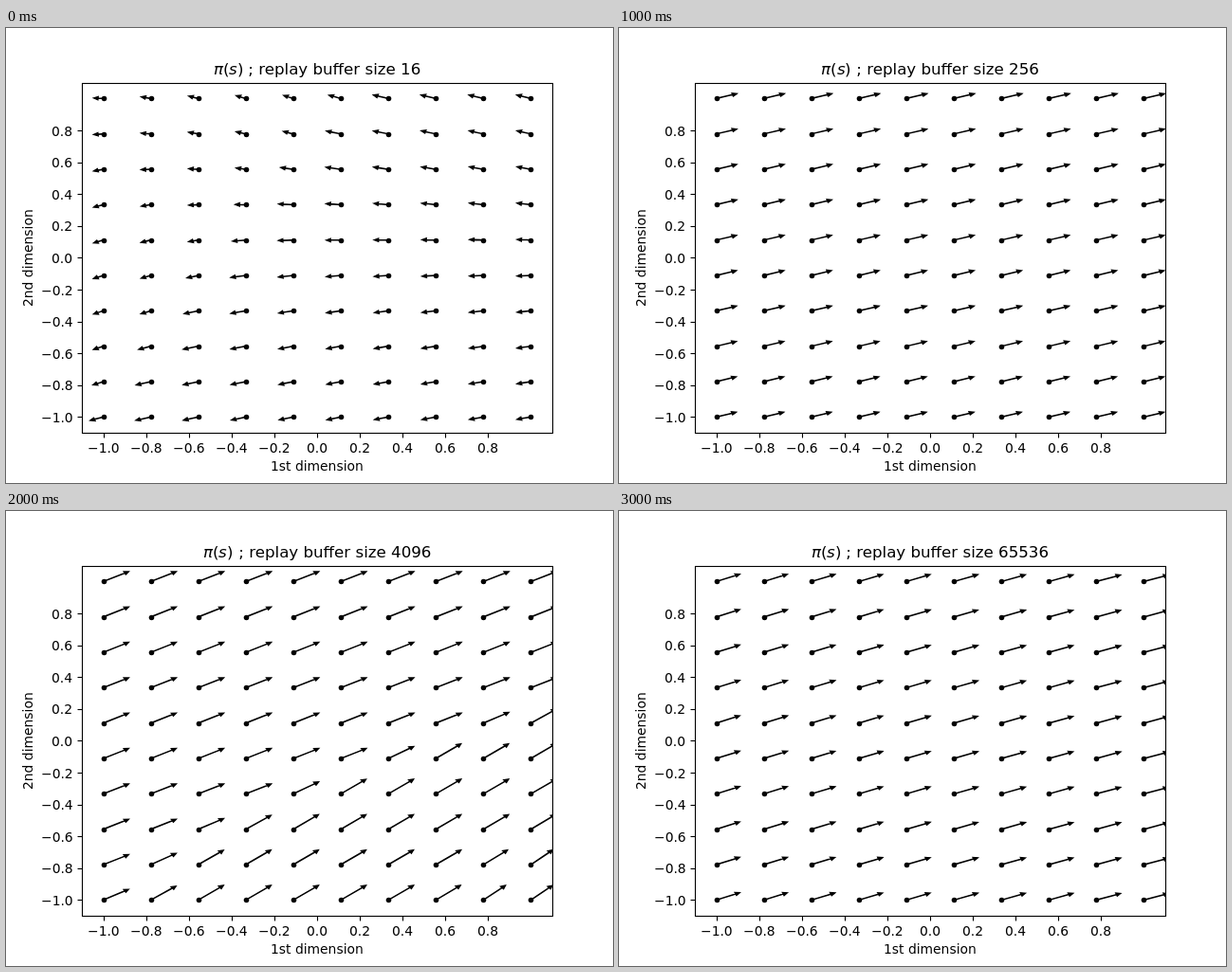
Recreate the animation shown at these times as an HTML page with a canvas. Size 640 by 480 pixels, loop 3500 ms.

```html
<!DOCTYPE html>
<html lang="en">
<head>
<meta charset="utf-8">
<title>Policy by replay buffer size</title>
<style>
  html, body { margin: 0; width: 100%; height: 100%; overflow: hidden; background: #fff; }
  canvas { display: block; width: 640px; height: 480px; }
</style>
</head>
<body>
<canvas id="stage" width="640" height="480"></canvas>
<script>
const ctx = document.getElementById('stage').getContext('2d');
const FAMILY = '"DejaVu Sans", sans-serif';
const PT = 100 / 72;
const STEP = 500;
const SX = 225.4545, SY = 168;          // pixels per data unit
const HEAD_LENGTH = 0.02, HEAD_HALF = 0.01, SHAFT_HALF = 0.0005;
const BOX = { left: 80, top: 57.6, right: 576, bottom: 427.2 };
const ALIGN = { left: 0, center: 0.5, right: 1 };
const px = x => 328 + x * SX;
const py = y => 242.4 - y * SY;
const snap = v => Math.round(v) + 0.5;
const mix = (a, b, t) => a + (b - a) * t;
const ramp = (a, b, v) => {
  const t = Math.min(1, Math.max(0, (v - a) / (b - a)));
  return t * t * (3 - 2 * t);
};

// Each field gives the arrow tip offset in pixels for column i, row j (from the top).
const scenes = [
  { size: 16, field(i, j) {
    const s = i + 0.58 * j - 5.1;
    const dx = -12 - 5.6 * ramp(-0.8, 0.8, s) + 1.1 * ramp(1, 5, s);
    const q = j - 4.7 + 4.2 * Math.exp(-i / 3);
    const dy = q < 0 ? 5 * Math.tanh(q / 3.6) : (4 - i * 0.13) * Math.tanh(q / 2.4);
    return [dx, dy];
  } },
  { size: 64, field: (i, j) => [10.5 + 2.3 * (i / 9) * (1 - j / 9), 14.7 - 0.03 * j] },
  { size: 256, field: (i, j) => [23.5 - 0.08 * j, -5.5] },
  { size: 1024, field: (i, j) => [3.5 + 0.05 * i, -9.6 + 0.07 * j] },
  { size: 4096, field(i, j) {
    const k = j - 4;
    const s = i - (8.5 - 2.6 * k + 0.2 * k * k);
    const t = ramp(-1, 1, s);
    return [mix(28.5, 28, t) - 4 * ramp(6, 8, s), mix(-11.2, -16.3, t)];
  } },
  { size: 16384, field: (i, j) =>
    [mix(14.5, 21, ramp(-0.5, 0.35, i - 0.35 - 0.43 * (j - 4))), -21] },
  { size: 65536, field: (i, j) => [26.5 + 0.1 * i, -8.3 + 0.11 * i] }
];

function setFont(points, style = '') {
  ctx.font = `${style} ${points * PT}px ${FAMILY}`;
}

function label(text, x, y, align) {
  const width = ctx.measureText(text).width;
  ctx.fillText(text, Math.round(x - width * ALIGN[align]), y);
}

function line(x1, y1, x2, y2) {
  ctx.beginPath();
  ctx.moveTo(x1, y1);
  ctx.lineTo(x2, y2);
  ctx.stroke();
}

function arrow(x, y, dx, dy) {
  const len = Math.hypot(dx, dy);
  const miter = 1.25 + 0.75 * (dx / len) ** 2;
  dx *= 1 - miter / len;
  dy *= 1 - miter / len;
  let ux = dx / SX, uy = dy / SY;
  const n = Math.hypot(ux, uy);
  ux /= n;
  uy /= n;
  const neckX = x + dx - HEAD_LENGTH * ux * SX;
  const neckY = y + dy - HEAD_LENGTH * uy * SY;
  const nx = -uy * SX, ny = ux * SY;
  const side = (cx, cy, half) => ctx.lineTo(cx + nx * half, cy + ny * half);
  ctx.beginPath();
  ctx.moveTo(x + dx, y + dy);
  side(neckX, neckY, HEAD_HALF);
  side(neckX, neckY, SHAFT_HALF);
  side(x, y, SHAFT_HALF);
  side(x, y, -SHAFT_HALF);
  side(neckX, neckY, -SHAFT_HALF);
  side(neckX, neckY, -HEAD_HALF);
  ctx.closePath();
  ctx.fill();
  ctx.stroke();
}

function dot(x, y) {
  ctx.beginPath();
  ctx.arc(snap(x), snap(y), 2.78, 0, Math.PI * 2);
  ctx.fill();
}

function drawArrows(field) {
  ctx.save();
  ctx.beginPath();
  ctx.rect(BOX.left, BOX.top, BOX.right - BOX.left, BOX.bottom - BOX.top);
  ctx.clip();
  ctx.lineWidth = PT;
  for (let j = 0; j < 10; j++) {
    for (let i = 0; i < 10; i++) {
      const x = px(-1 + i * 2 / 9), y = py(1 - j * 2 / 9);
      arrow(x, y, ...field(i, j));
      dot(x, y);
    }
  }
  ctx.restore();
}

function drawAxes() {
  const left = snap(BOX.left), top = snap(BOX.top);
  const right = snap(BOX.right), bottom = snap(BOX.bottom);
  ctx.lineWidth = 0.8 * PT;
  ctx.strokeRect(left, top, right - left, bottom - top);
  setFont(10);
  for (let k = -5; k < 5; k++) {
    const v = k / 5;
    const text = v.toFixed(1).replace('-', '\u2212');
    const x = snap(px(v)), y = snap(py(v));
    line(x, bottom, x, bottom + 5);
    line(left - 5, y, left, y);
    label(text, px(v), 448, 'center');
    label(text, 70.3, Math.round(py(v) + 5.5), 'right');
  }
  label('1st dimension', 328, 467, 'center');
  ctx.save();
  ctx.translate(28, 243);
  ctx.rotate(-Math.PI / 2);
  label('2nd dimension', 0, 0, 'center');
  ctx.restore();
}

function drawTitle(size) {
  const parts = [['π', 'italic'], ['(', ''], ['s', 'italic'], [')', ''],
                 [` ; replay buffer size ${size}`, '']];
  const widths = parts.map(([text, style]) => {
    setFont(12, style);
    return ctx.measureText(text).width;
  });
  let x = 328 - widths.reduce((a, b) => a + b) / 2;
  parts.forEach(([text, style], k) => {
    setFont(12, style);
    label(text, x, 49, 'left');
    x += widths[k];
  });
}

function draw({ size, field }) {
  ctx.fillStyle = '#fff';
  ctx.fillRect(0, 0, 640, 480);
  ctx.fillStyle = ctx.strokeStyle = '#000';
  drawArrows(field);
  drawAxes();
  drawTitle(size);
}

let shown = -1;
const start = performance.now();
function tick() {
  const elapsed = Math.max(0, performance.now() - start);
  const index = Math.floor(elapsed / STEP) % scenes.length;
  if (index !== shown) {
    draw(scenes[index]);
    shown = index;
  }
  requestAnimationFrame(tick);
}
tick();
</script>
</body>
</html>
```
